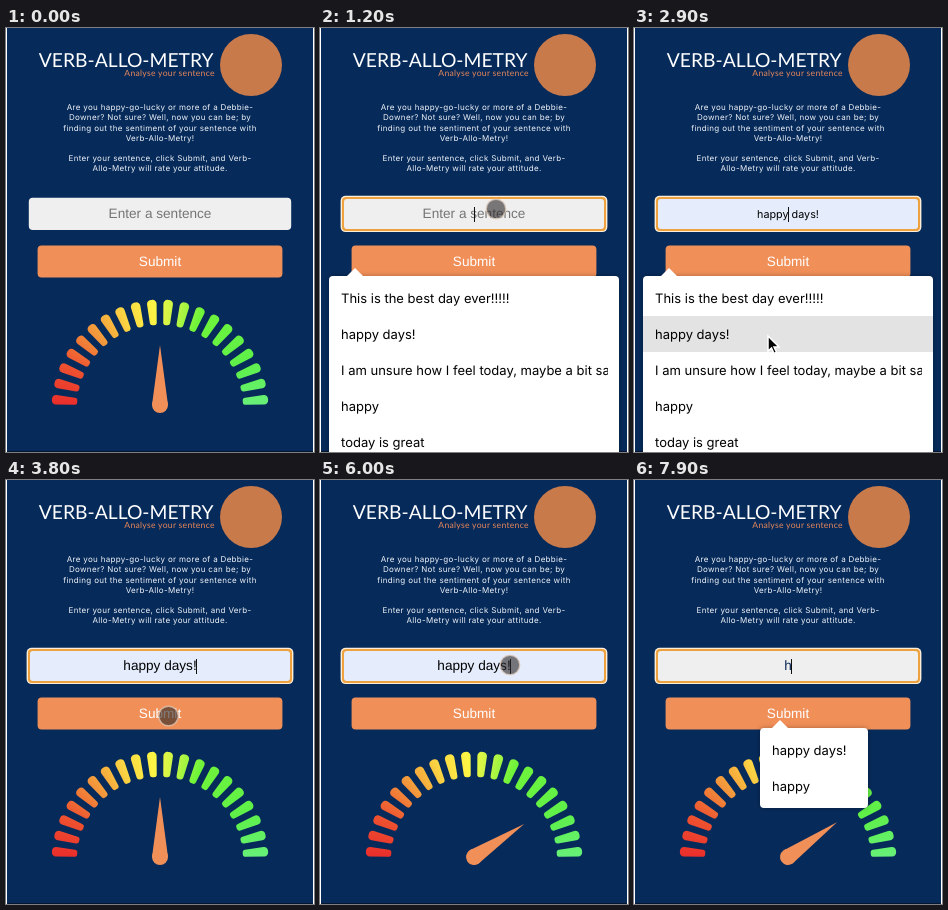
An HTML page with a canvas that plays this animation: 308x424 px, repeating every 8000 ms.

```html
<!DOCTYPE html>
<html lang="en">
<head>
<meta charset="utf-8">
<title>Sentence mood gauge</title>
<style>
  html, body { margin: 0; width: 308px; height: 424px; overflow: hidden; background: #062a5a; }
  canvas { display: block; }
</style>
</head>
<body>
<canvas id="stage" width="308" height="424"></canvas>
<script>
const ctx = document.getElementById('stage').getContext('2d');
ctx.textRendering = 'geometricPrecision';

const LOOP = 8000, STEP = 100;
const NAVY = '#062a5a', ORANGE = '#f18f58';
const INTER = 'Inter, sans-serif', ARIAL = '"Liberation Sans", Arial, sans-serif', LATO = 'Lato, sans-serif';
const HISTORY = [
  'This is the best day ever!!!!!', 'happy days!',
  'I am unsure how I feel today, maybe a bit sad', 'happy', 'today is great'
];
const INTRO = [
  ['Are you happy-go-lucky or more of a Debbie-', 82],
  ['Downer? Not sure? Well, now you can be; by', 92.3],
  ['finding out the sentiment of your sentence with', 102.5],
  ['Verb-Allo-Metry!', 112.8],
  ['Enter your sentence, click Submit, and Verb-', 132.7],
  ['Allo-Metry will rate your attitude.', 143.2]
];
// Pointer stops: time, x, y
const POINTER = [
  [0, 306, 430], [900, 176, 181], [1900, 176, 181], [2200, 158, 270], [2400, 158, 270],
  [2900, 134, 308], [3000, 128, 311], [3100, 128, 311], [3600, 162.5, 236],
  [5400, 162.5, 236], [5900, 190, 185], [8000, 190, 185]
];

const within = (t, from, to) => t >= from && t < to;

function text(str, x, y, size, family, color, align = 'center', spacing = 0) {
  ctx.font = `${size}px ${family}`;
  ctx.letterSpacing = `${spacing}px`;
  ctx.textAlign = align;
  ctx.fillStyle = color;
  ctx.fillText(str, x, y);
  return ctx.measureText(str).width;
}

function box(x, y, w, h, r, color) {
  ctx.fillStyle = color;
  ctx.beginPath();
  ctx.roundRect(x, y, w, h, r);
  ctx.fill();
}

function disc(x, y, r, color) {
  ctx.fillStyle = color;
  ctx.beginPath();
  ctx.arc(x, y, r, 0, 2 * Math.PI);
  ctx.fill();
}

function pointerAt(t) {
  const i = POINTER.findIndex(stop => stop[0] > t);
  const [t0, x0, y0] = POINTER[i - 1], [t1, x1, y1] = POINTER[i];
  const p = (t - t0) / (t1 - t0), k = p * p * (3 - 2 * p);
  return [x0 + (x1 - x0) * k, y0 + (y1 - y0) * k];
}

function drawHeader() {
  ctx.fillStyle = '#fff';
  ctx.fillRect(0, 0, 308, 424);
  ctx.fillStyle = NAVY;
  ctx.fillRect(1, 0, 306, 424);
  ctx.fillStyle = '#04152e';
  ctx.fillRect(1, 423, 306, 1);
  text('VERB-ALLO-METRY', 207.5, 38.5, 19.3, LATO, '#fff', 'right');
  text('Analyse your sentence', 208.8, 48, 8.6, LATO, '#e8875a', 'right', 0.28);
  disc(245, 37, 31, '#c87a4b');
  for (const [line, y] of INTRO) text(line, 154, y, 8, INTER, '#eef2f8', 'center', 0.32);
}

const scale = ctx.createConicGradient(Math.PI, 154, 380);
[[0, '#ea2b2b'], [.15, '#ee5530'], [.27, '#f2963c'], [.33, '#f7b53e'], [.38, '#fbd343'], [.48, '#fdf545'],
 [.55, '#c4f646'], [.63, '#70f43a'], [.85, '#5ef04a'], [1, '#68f07c']]
  .forEach(([p, color]) => scale.addColorStop(p / 2, color));

function drawGauge(t) {
  const outer = -108.4, inner = -83;
  ctx.beginPath();
  for (let i = 0; i < 20; i++) {
    ctx.save();
    ctx.translate(154, 380);
    ctx.rotate((i - 9.5) * Math.PI / 20);
    ctx.moveTo(0, outer);
    ctx.arcTo(5.1, outer, 3.3, inner, 4);
    ctx.arcTo(3.3, inner, 0, inner, 2.8);
    ctx.arcTo(-3.3, inner, -5.1, outer, 2.8);
    ctx.arcTo(-5.1, outer, 0, outer, 4);
    ctx.closePath();
    ctx.restore();
  }
  ctx.fillStyle = scale;
  ctx.fill();

  // Elastic swing over three seconds
  const p = Math.min(1, Math.max(0, (t - 4605) / 3000));
  const swing = p ? 1 - 2 ** (-10 * p) * Math.cos(2 * Math.PI * p / 0.3) : 0;
  ctx.save();
  ctx.translate(154, 377);
  ctx.rotate(54.7 * swing * Math.PI / 180);
  disc(0, 0, 8, ORANGE);
  ctx.beginPath();
  ctx.moveTo(-8, 0);
  ctx.lineTo(0, -60);
  ctx.lineTo(8, 0);
  ctx.fill();
  ctx.restore();
}

function drawField(focused, value, preview, autofilled) {
  const fill = autofilled ? '#e5edfd' : '#efefef';
  if (focused) {
    box(20.6, 167.7, 266.8, 36.4, 5, '#fbeeda');
    box(22, 169, 264, 34, 4, '#eda23f');
    box(24, 171, 260, 30, 3, fill);
  } else {
    box(22.8, 169.8, 262.4, 32.2, 4, fill);
  }
  let caret = 154;
  if (preview) text(preview, 154, 190, 10.8, INTER, '#000');
  else if (value) caret += text(value, 154, 190.3, 13.6, ARIAL, autofilled ? '#000' : '#0b2a55') / 2;
  else text('Enter a sentence', 154, 190.3, 13.6, ARIAL, '#757575');
  if (focused) {
    ctx.fillStyle = '#111';
    ctx.fillRect(Math.floor(caret), 179, 1, 15);
  }
}

function drawPopup(rows, x, w, arrow, hovered) {
  ctx.save();
  ctx.shadowColor = 'rgba(0,0,0,.3)';
  ctx.shadowBlur = 5;
  box(x, 248, w, rows.length * 36 + 8, 4, '#fff');
  ctx.restore();
  ctx.fillStyle = '#fff';
  ctx.beginPath();
  ctx.moveTo(arrow - 9, 249);
  ctx.lineTo(arrow, 240);
  ctx.lineTo(arrow + 9, 249);
  ctx.fill();
  if (hovered >= 0) {
    ctx.fillStyle = '#e3e3e3';
    ctx.fillRect(x, 252 + 36 * hovered, w, 36);
  }
  ctx.save();
  ctx.beginPath();
  ctx.rect(x, 248, w - 11, 176);
  ctx.clip();
  rows.forEach((row, i) => text(row, x + 12, 275 + 36 * i, 13, INTER, '#000', 'left'));
  ctx.restore();
}

function drawPointer(x, y, pressed) {
  ctx.save();
  ctx.translate(x, y);
  ctx.lineWidth = 1.5;
  if (pressed) {
    disc(0, 0, 9.8, 'rgba(40,36,36,.6)');
    ctx.strokeStyle = 'rgba(225,205,190,.7)';
  } else {
    ctx.beginPath();
    [[0, 0], [0, 15], [3.5, 12], [6, 17.5], [8.5, 16.3], [6, 11], [10.8, 10.8]]
      .forEach(p => ctx.lineTo(...p));
    ctx.closePath();
    ctx.fillStyle = '#000';
    ctx.fill();
    ctx.strokeStyle = '#fff';
  }
  ctx.stroke();
  ctx.restore();
}

function typedValue(t) {
  if (t < 3000) return '';
  // One backspace, then key repeat
  const deleted = t < 6700 ? 0 : t < 7200 ? 1 : 2 + Math.floor((t - 7200) / 80);
  return 'happy days!'.slice(0, Math.max(1, 11 - deleted));
}

function draw(t) {
  const [px, py] = pointerAt(t);
  const value = typedValue(t);
  const picking = within(t, 1100, 3000), editing = t >= 6700;
  const hovered = picking && py >= 252 ? Math.floor((py - 252) / 36) : -1;
  const focused = within(t, 1000, 3900) || t >= 6000;
  const pressed = [[1000, 2000], [3000, 3200], [3800, 5300], [6000, 6300]].some(span => within(t, ...span));

  drawHeader();
  drawField(focused, value, HISTORY[hovered], hovered >= 0 || (value && !editing));
  box(31.6, 217.6, 244.8, 32, 4, ORANGE);
  text('Submit', 154, 238.3, 13.6, ARIAL, '#fff');
  drawGauge(t);
  if (picking) drawPopup(HISTORY, 9, 290, 35, hovered);
  if (editing) drawPopup(HISTORY.filter(row => row.startsWith(value)), 126, 108, 146, -1);
  if (within(t, 100, 6400)) drawPointer(px, py, pressed);
}

const start = performance.now();
function tick() {
  const t = (performance.now() - start) % LOOP;
  draw(Math.floor(t / STEP) * STEP);
  requestAnimationFrame(tick);
}
tick();
</script>
</body>
</html>
```
